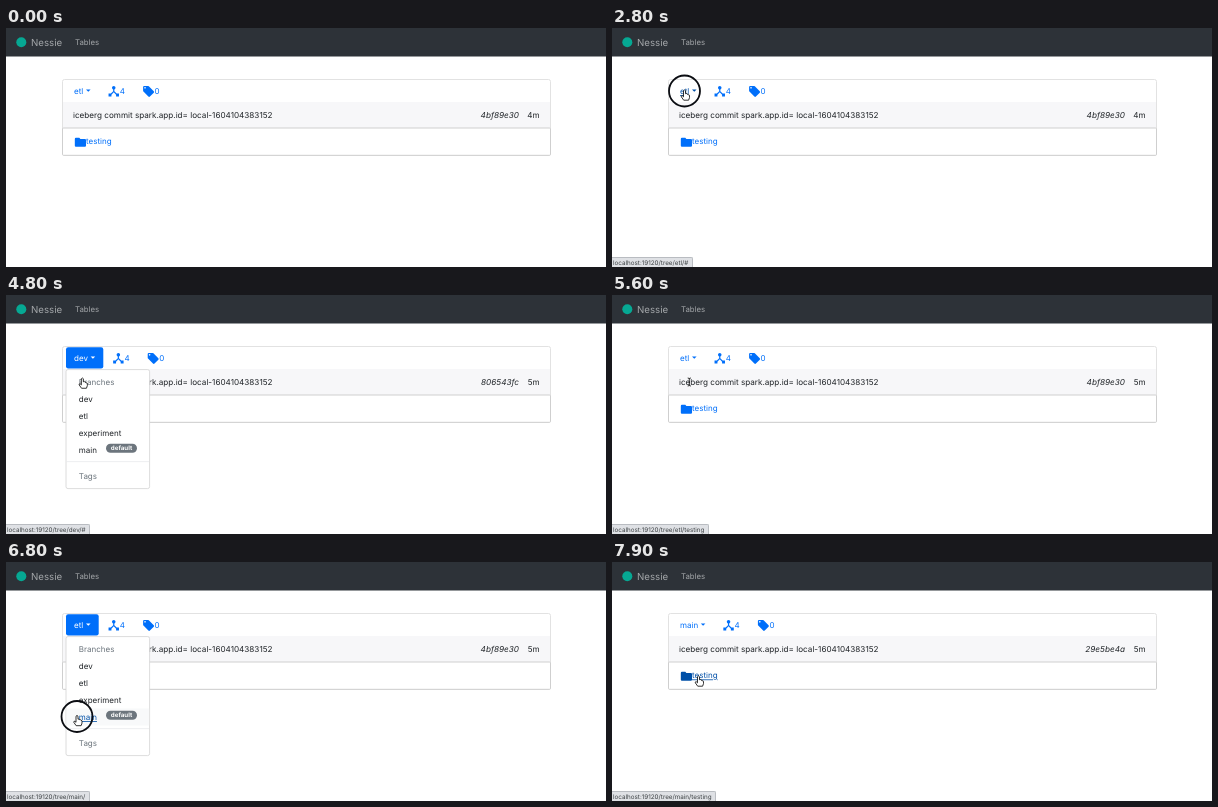
These frames come from a looping animation (600x239 px, 8 s). An HTML page:

```html
<!DOCTYPE html>
<html lang="en">
<head>
<meta charset="utf-8">
<title>Nessie tables</title>
<style>
html, body { margin: 0; width: 100%; height: 100%; overflow: hidden; background: #fff; }
body { font: 8px Inter, "Open Sans", sans-serif; text-rendering: geometricPrecision; }
svg { position: absolute; left: 0; top: 0; width: 600px; height: 239px; }
#link-bar {
  position: absolute; left: 0; top: 229px; height: 10px; padding: 0 3.5px 0 1px;
  box-sizing: border-box; border: solid #b9bcc1; border-width: 1px 1px 0 0;
  border-radius: 0 2px 0 0; background: #dfe1e5; color: #3c4043;
  font-size: 6.3px; line-height: 10px; white-space: nowrap;
}
#link-bar:empty { display: none; }
.hot { text-decoration: underline; }
</style>
</head>
<body>
<svg id="stage" viewBox="0 0 600 239"></svg>
<div id="link-bar"></div>
<script>
const LOOP = 8000, TICK = 100;
const BLUE = '#006ffa', DARK = '#0050a8', INK = '#212529', GRAY = '#6c757d';
const stage = document.getElementById('stage');
const linkBar = document.getElementById('link-bar');
const hashes = { etl: '4bf89e30', dev: '806543fc', main: '29e5be4a' };
const labelWidth = { etl: 9.7, dev: 14.3, main: 18.5 };
const menuItems = ['dev', 'etl', 'experiment', 'main'];

const icons = {
  hub: 'M17 16l-4-4V8.82C14.16 8.4 15 7.3 15 6c0-1.66-1.34-3-3-3S9 4.34 9 6c0 1.3.84 2.4 2 2.82V12l-4 4H3v5h5v-3.05l4-4.2 4 4.2V21h5v-5z',
  tag: 'M21.4 11.6l-9-9Q11.8 2 11 2H4Q2 2 2 4v7q0 .8.6 1.4l9 9q1.4 1.2 2.8 0l7-7q1.2-1.4 0-2.8zM5.5 7a1.5 1.5 0 1 1 0-3 1.5 1.5 0 0 1 0 3z',
  folder: 'M10 4H4Q2 4 2 6v12q0 2 2 2h16q2 0 2-2V8q0-2-2-2h-8z'
};
const cursors = {
  arrow: '<path d="M0 0V8.8L2 7 3.4 10 4.9 9.3 3.6 6.4H6.3Z" stroke="#fff" stroke-width=".6"/>',
  hand: '<path d="M-1-.3Q0-1.8 1-.3V2.7Q2.1 2 2.6 3.2 3.8 2.8 4 3.9 5 3.7 5 4.8V6.6L4.1 9.2H-.8L-3.2 5.8Q-3.4 4.4-2.1 4.8L-1 5.8Z" fill="#fff" stroke="#000" stroke-width=".8"/>',
  beam: '<path d="M-1.6-4Q0-4 0-3V3Q0 4-1.6 4M1.6-4Q0-4 0-3M0 3Q0 4 1.6 4" fill="none" stroke="#000" stroke-width=".8"/>'
};

// Pointer path: time, x, y
const path = [
  [500, 140, 119], [1300, 97, 104], [1600, 75, 62.5], [2100, 73, 63], [2300, 72.5, 63],
  [3200, 72.5, 63], [3500, 75, 104], [3900, 75, 104], [4000, 77.3, 103], [4400, 76, 64],
  [4700, 76, 64], [4950, 77, 121], [5300, 77, 119], [5450, 77, 116], [5600, 77.3, 87],
  [5750, 73, 63], [6000, 73, 63], [6300, 70, 138], [6500, 71, 154.5], [7000, 71, 154.5],
  [7400, 153, 143], [7800, 86.5, 115]
];
// Each step changes part of the page state
const steps = [
  [0, { branch: 'etl', age: '4m', open: false, url: '', hover: '', cursor: '' }],
  [500, { cursor: 'arrow' }],
  [2300, { cursor: 'hand', hover: 'button', url: 'etl/#' }],
  [2900, { open: true }],
  [3300, { hover: '' }],
  [3400, { hover: 'dev', url: 'dev/' }],
  [3900, { branch: 'dev', age: '5m', open: false, hover: '', cursor: 'arrow' }],
  [4200, { url: '' }],
  [4300, { cursor: 'hand', hover: 'button', url: 'dev/#' }],
  [4700, { open: true }],
  [4900, { hover: 'etl', url: 'etl/' }],
  [5200, { branch: 'etl', open: false, hover: '' }],
  [5300, { hover: 'testing', url: 'etl/testing' }],
  [5500, { hover: '', cursor: 'beam' }],
  [5700, { hover: 'button', cursor: 'hand', url: 'etl/#' }],
  [6000, { open: true }],
  [6200, { hover: 'dev', url: 'dev/' }],
  [6300, { hover: 'experiment', url: 'experiment/' }],
  [6500, { hover: 'main', url: 'main/' }],
  [6900, { branch: 'main', open: false, hover: '', cursor: 'arrow' }],
  [7300, { url: '' }],
  [7800, { cursor: 'hand', hover: 'testing', url: 'main/testing' }]
];
const clicks = [[2700, 3000], [3700, 3900], [4500, 4800], [5000, 5200], [5800, 6100], [6700, 6900]];

const text = (x, y, s, fill = INK, more = '') => `<text x="${x}" y="${y}" fill="${fill}" ${more}>${s}</text>`;
const rect = (x, y, w, h, fill, more = '') => `<rect x="${x}" y="${y}" width="${w}" height="${h}" fill="${fill}" ${more}/>`;
const icon = (name, x, y, fill, scale) =>
  `<path d="${icons[name]}" fill="${fill}" transform="translate(${x} ${y}) scale(${scale})"/>`;
const link = (x, y, s, hot, fill = BLUE) => text(x, y, s, hot ? DARK : fill, hot ? 'class="hot"' : '');

function pointer(t) {
  const i = path.findIndex(p => p[0] > t);
  if (i < 1) return (i ? path[path.length - 1] : path[0]).slice(1);
  const [a, b] = [path[i - 1], path[i]];
  const u = (t - a[0]) / (b[0] - a[0]), e = u * u * (3 - 2 * u);
  return [a[1] + (b[1] - a[1]) * e, a[2] + (b[2] - a[2]) * e];
}

function navbar() {
  return rect(0, 0, 600, 28.5, '#2d3238') +
    '<circle cx="15.3" cy="14.2" r="5" fill="#06a893"/>' +
    text(25, 17.5, 'Nessie', '#a3a6a9', 'font-size="9.7"') +
    text(69, 17, 'Tables', '#a3a6a9', 'font-size="7.8"');
}

function card(s) {
  const hot = s.hover === 'testing';
  return rect(56.5, 51.5, 488, 76, '#fff', 'rx="2" stroke="#e2e2e2"') +
    rect(57, 74, 487, 26, '#f7f7f9') +
    rect(56.5, 100, 488, 27.3, '#fff', 'rx="1" stroke="#cfcfcf"') +
    text(67, 90, 'iceberg commit spark.app.id= local-1604104383152', INK, 'font-size="8.15"') +
    text(513, 90, hashes[s.branch], INK, 'font-size="8.2" font-style="italic" text-anchor="end"') +
    text(533.6, 90, s.age, INK, 'font-size="8.1" text-anchor="end"') +
    icon('folder', 67.7, 107.6, hot ? DARK : BLUE, .56) +
    link(80, 116.4, 'testing', hot);
}

function toolbar(s) {
  const w = labelWidth[s.branch], shift = w - labelWidth.etl;
  const hot = s.hover === 'button' && !s.open;
  const fill = s.open ? '#fff' : hot ? DARK : BLUE;
  return (s.open ? rect(60, 52.3, 23 + w, 21.2, BLUE, 'rx="2.2"') : '') +
    link(68, 66, s.branch, hot, fill) +
    `<path d="M${70.3 + w} 61.4h4.6l-2.3 2.3z" fill="${fill}"/>` +
    icon('hub', 100.8 + shift, 56.3, BLUE, .58) + text(113.8 + shift, 66, '4', BLUE) +
    icon('tag', 136 + shift, 56.8, BLUE, .55) + text(148.6 + shift, 66, '0', BLUE);
}

function menu(s) {
  return rect(60, 74.6, 83.6, 119, '#fff', 'rx="2" stroke="#d4d4d4" stroke-width=".8"') +
    text(72.8, 90, 'Branches', GRAY) +
    menuItems.map((name, i) => {
      const y = 107 + 17 * i, hot = s.hover === name;
      return (hot ? rect(60.5, y - 11.5, 82.6, 17, '#f8f9fa') : '') + link(72.8, y, name, hot, INK);
    }).join('') +
    rect(100, 148.7, 31, 9, GRAY, 'rx="4.5"') +
    text(115.5, 155.3, 'default', '#fff', 'font-size="6.2" font-weight="700" text-anchor="middle"') +
    rect(60.5, 166.4, 82.6, .7, '#e4e7ea') +
    text(72.8, 184, 'Tags', GRAY);
}

function draw(t) {
  const s = Object.assign({}, ...steps.filter(p => p[0] <= t).map(p => p[1]));
  const [x, y] = pointer(t);
  const pressed = clicks.some(([a, b]) => t >= a && t < b);
  stage.innerHTML = navbar() + card(s) + toolbar(s) + (s.open ? menu(s) : '') +
    (pressed ? `<circle cx="${x}" cy="${y}" r="15.5" fill="none" stroke="#0b0d12" stroke-width="1.8"/>` : '') +
    (s.cursor ? `<g transform="translate(${x} ${y})">${cursors[s.cursor]}</g>` : '');
  linkBar.textContent = s.url && 'localhost:19120/tree/' + s.url;
}

const start = performance.now();
let last = -1;
function frame() {
  const t = Math.floor((performance.now() - start) % LOOP / TICK) * TICK;
  if (t !== last) draw(last = t);
  requestAnimationFrame(frame);
}
frame();
</script>
</body>
</html>
```
